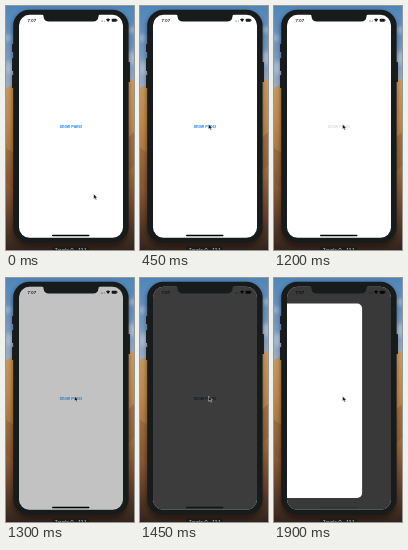
An HTML page for the animation above (1.95 s loop, 128x244 px).

```html
<!DOCTYPE html>
<html lang="en">
<head>
<meta charset="utf-8">
<title>Side panel</title>
<style>
  html, body { margin: 0; width: 100%; height: 100%; overflow: hidden; background: #4a3324; }
  svg { display: block; width: 100vw; height: 100vh; }
  text { font-family: Inter, "Liberation Sans", sans-serif; font-weight: 600; }
</style>
</head>
<body>
<svg viewBox="0 0 128 244" preserveAspectRatio="none">
  <defs>
    <linearGradient id="sky" x2="0" y2="1">
      <stop offset="0" stop-color="#4f86b8"/>
      <stop offset=".5" stop-color="#7398c0"/>
      <stop offset="1" stop-color="#a6b4c6"/>
    </linearGradient>
    <linearGradient id="sand" x2="0" y2="1">
      <stop offset="0" stop-color="#c99b62"/>
      <stop offset=".25" stop-color="#c08a4e"/>
      <stop offset=".5" stop-color="#a5713f"/>
      <stop offset=".75" stop-color="#71492e"/>
      <stop offset="1" stop-color="#33241d"/>
    </linearGradient>
    <filter id="soft" x="-20%" y="-20%" width="140%" height="140%"><feGaussianBlur stdDeviation="2"/></filter>
    <clipPath id="screenClip"><rect x="13" y="8.8" width="104" height="223" rx="10.5"/></clipPath>
  </defs>

  <rect width="128" height="90" fill="url(#sky)"/>
  <g fill="#c3cfdd" opacity=".6" filter="url(#soft)">
    <ellipse cx="1" cy="32" rx="5" ry="3"/><ellipse cx="4" cy="62" rx="5" ry="7"/>
    <ellipse cx="126" cy="24" rx="5" ry="3"/><ellipse cx="126" cy="52" rx="5" ry="7"/>
  </g>
  <path d="M0 82 Q6 77 12 80 L115 72 Q122 72 128 74 V244 H0Z" fill="url(#sand)"/>
  <path d="M0 142 L12 150 V188 L0 176Z M128 126 L116 138 V170 L128 160Z" fill="#7a4e2e" opacity=".35"/>
  <rect x="6" y="5" width="117" height="236" rx="17" fill="#000" opacity=".35" filter="url(#soft)"/>

  <g fill="#1b1e1f">
    <rect x="6" y="38" width="2" height="8" rx=".6"/>
    <rect x="6" y="52" width="2" height="13" rx=".6"/>
    <rect x="6" y="69" width="2" height="13" rx=".6"/>
    <rect x="122" y="56" width="2" height="20" rx=".6"/>
  </g>
  <rect x="7.2" y="3.7" width="115.4" height="233" rx="16" fill="#181b1c"/>

  <g clip-path="url(#screenClip)">
    <rect x="12" y="8" width="106" height="225" fill="#fff"/>
    <g id="status" fill="#181b1c">
      <text x="21.6" y="16.2" font-size="4.1">7:07</text>
      <circle cx="95.2" cy="15" r=".4"/><circle cx="96.7" cy="15" r=".4"/><circle cx="98.2" cy="15" r=".4"/>
      <path d="M100 13.5 Q102.1 11.7 104.2 13.5 L102.1 16Z"/>
      <rect x="105.7" y="12.7" width="5.1" height="3" rx=".8"/>
      <rect x="111.1" y="13.6" width=".5" height="1.2"/>
    </g>
    <text id="button" x="64.7" y="121.6" font-size="4" text-anchor="middle">Show Panel</text>
    <rect id="shade" x="12" y="8" width="106" height="225"/>
    <rect id="indicator" x="46" y="228.7" width="37.5" height="1.5" rx=".75"/>
    <rect id="panel" x="-80" y="25.5" height="194.5" width="92" rx="5" fill="#fff"/>
  </g>
  <path d="M35 8 Q37.5 8 37.5 10.5 Q38 15.6 43 15.6 H87 Q92 15.6 92.5 10.5 Q92.5 8 95 8Z" fill="#181b1c"/>

  <rect x="46" y="240.5" width="37" height="6" rx="1.5" fill="#1c1a1a"/>
  <text x="64.5" y="246" font-size="4.6" text-anchor="middle" fill="#bbb" style="font-weight:500">Tavelo Q – 12.1</text>
  <path id="cursor" d="M0 0 V5.1 L1.2 4 L2.1 6 L3 5.6 L2.1 3.7 H3.7Z" fill="#080808" stroke="#fff" stroke-width=".45"/>
</svg>

<script>
const LOOP = 1950, STEP = 50;
const el = id => document.getElementById(id);
const [button, shade, indicator, panel, cursor] =
  ["button", "shade", "indicator", "panel", "cursor"].map(el);

const mix = (a, b, u) => a + (b - a) * u;
function ease(t, start, end) {
  const u = Math.min(1, Math.max(0, (t - start) / (end - start)));
  return u * u * (3 - 2 * u);
}

function draw(t) {
  const move = ease(t, 0, 430);
  cursor.setAttribute("transform", `translate(${mix(87.7, 68.6, move)} ${mix(188, 118.2, move)})`);

  // The button fades while pressed, then loses its tint behind the shade.
  const pressed = t >= 1150 && t < 1250;
  const gray = ease(t, 1300, 1550);
  button.setAttribute("opacity", pressed ? 0.22 : mix(0.22, 1, t < 1150 ? 1 : ease(t, 1200, 1350)));
  button.setAttribute("fill", pressed ? "#555" : `rgb(${mix(0, 85, gray)},${mix(122, 85, gray)},${mix(255, 85, gray)})`);

  shade.setAttribute("opacity", 0.775 * ease(t, 1200, 1470));
  indicator.setAttribute("opacity", mix(1, 0.15, ease(t, 1350, 1600)));
  panel.setAttribute("x", mix(-80, -3.5, ease(t, 1440, 1920)));
}

function tick(now) {
  draw(Math.floor((now % LOOP) / STEP) * STEP);
  requestAnimationFrame(tick);
}
draw(0);
requestAnimationFrame(tick);
</script>
</body>
</html>
```
